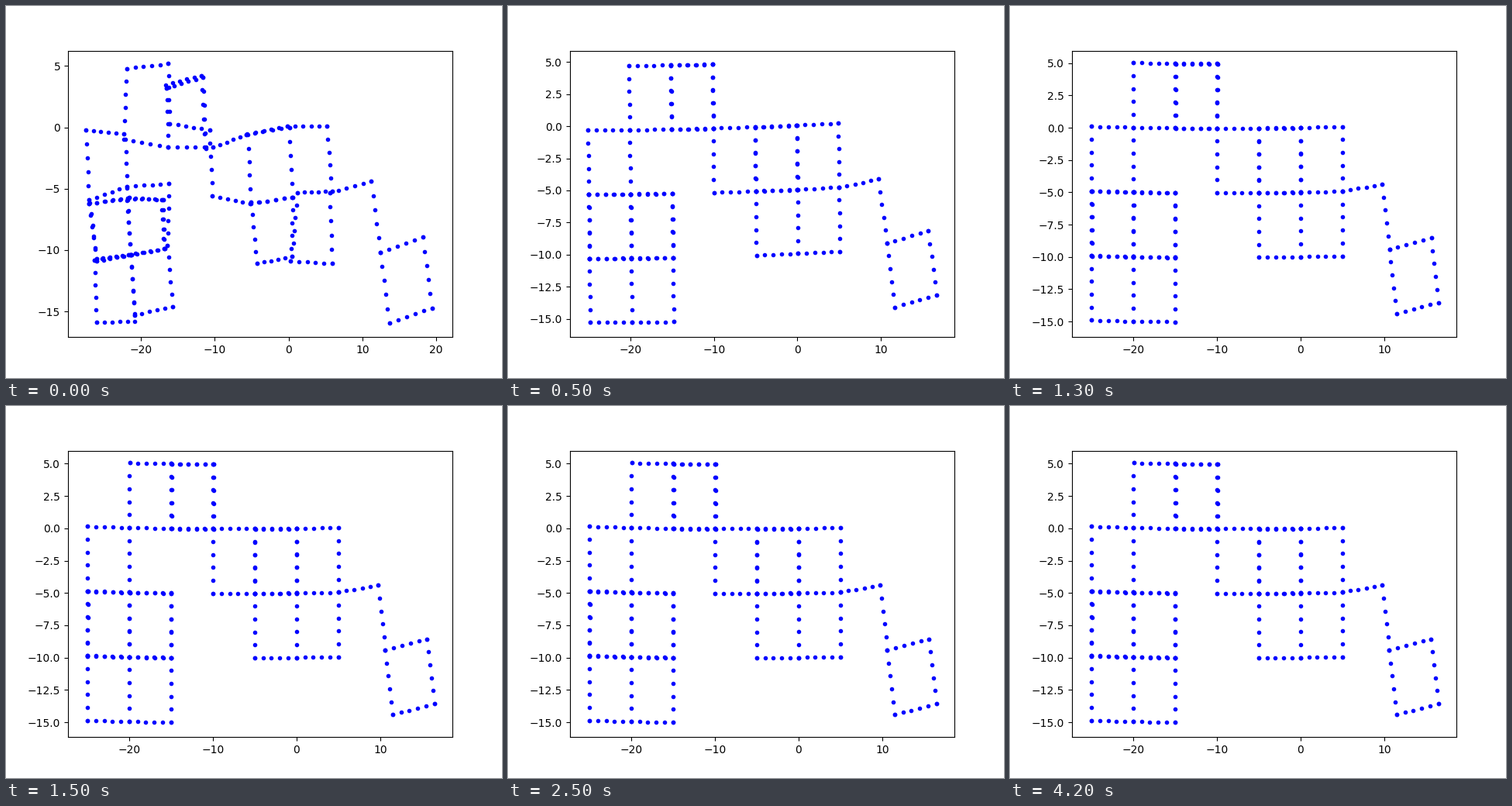
These frames come from a looping animation (640 by 480 pixels, 5 s). A matplotlib script:

```python
import numpy as np
import matplotlib.pyplot as plt
from matplotlib.animation import FuncAnimation

COMPASS = {"E": (1, 0), "N": (0, 1), "W": (-1, 0), "S": (0, -1)}

# View per solver iteration: x0, x1, y0, y1
VIEWS = [
    (-29.88, 22.20, -17.09, 6.254),
    (-27.24, 18.81, -16.429, 5.891),
    (-27.34, 18.63, -16.20, 5.96),
    (-27.34, 18.63, -16.15, 6.01),
]
TILTS = [None, 0.018, -0.001, -0.003]  # remaining rotation of the solved map
PIVOT = (-4, -5)


def drive(start, moves, leg=5.0, tilt=0.0):
    """Corners met when driving whole legs along a tilted compass."""
    c, s = np.cos(np.radians(tilt)), np.sin(np.radians(tilt))
    corners = [start]
    for move in moves:
        dx, dy = COMPASS[move]
        x, y = corners[-1]
        corners.append((x + leg * (c * dx - s * dy), y + leg * (s * dx + c * dy)))
    return corners


def stops(path, steps=5):
    """Evenly spaced stops on every leg of a path."""
    path = np.array(path)
    t = np.arange(steps + 1)[:, None] / steps
    return np.vstack([a + t * (b - a) for a, b in zip(path, path[1:])])


def odometry():
    """Dead reckoning: the same streets, drifting further on each pass."""
    rng = np.random.default_rng(4)
    west = [(-27.5, -0.2), (-27, -5.9), (-21.9, -4.8), (-16.2, -4.6),
            (-16.4, -9.6), (-15.7, -14.6), (-20.9, -15.3), (-21.3, -10.4),
            (-26.3, -10.8), (-26, -15.9), (-20.8, -15.8)]
    north = [(-27.5, -0.2), (-22.3, -0.5), (-21.9, 4.8), (-16.3, 5.2),
             (-16.1, 0.3), (-10.7, -0.2), (-10.3, -5.6), (-5.2, -6.2),
             (0.6, -5.7), (0.3, -10.9), (5.9, -11.1), (5.6, -5.3)]
    tail = drive((11.2, -4.4), "SSENW", leg=5.9, tilt=12)
    middle = [(-22.3, -1), (-16.3, -1.6), (-10.2, -1.6), (-5.7, -0.6),
              (-0.2, 0.1), (5.2, 0.1), (5.9, -5.2), (1.2, -5.3),
              (0.5, -10.5), (-4.3, -11.1), (-5.1, -6.1), (-5.5, -0.6)]
    box = [(-16.3, -1.6), (-16.5, 3.2), (-11.6, 4.1), (-11.2, -1.6)]
    yard = [(-27, -6.2), (-21.8, -5.8), (-17, -5.9), (-16.8, -9.9),
            (-21.5, -10.4), (-26, -10.9), (-27, -6.2)]
    spine = [(-22.1, -1), (-21.8, -5.9), (-21.4, -10.4), (-20.9, -15.2)]
    east = [(-5.6, -0.5), (0.1, 0), (0.5, -5.7), (-5.1, -6.2)]

    paths = [west, north + tail, middle, box, yard, spine, east]
    for again in (yard, box[1:], spine[1:3]):
        paths.append(np.array(again) + rng.normal(0, 0.12, (len(again), 2)))
    return np.vstack([stops(p) for p in paths])


def street_map():
    """Ideal streets: 5 m blocks, plus a tilted block in the south-east."""
    tail = [(5, -5)] + drive((9.75, -4.45), "SSENW", leg=5.08, tilt=9.9)
    paths = [
        drive((-25, 0), "SSSEENNWW"),
        drive((-20, 5), "SSSS"),
        drive((-20, 5), "EESSEEE"),
        drive((-15, 5), "S"),
        drive((-25, 0), "EEEEEESSWWNN"),
        drive((-25, -10), "EE"),
        drive((0, 0), "SS"),
        tail,
    ]
    revisits = [
        drive((-15, 5), "ESWN"),
        drive((-5, 0), "ESWN"),
        drive((-25, -5), "EESWWN"),
        drive((-20, -5), "S"),
    ]
    return np.vstack([stops(p) for p in paths]
                     + [stops(p) + (0.03, -0.03) for p in revisits])


def solved(tilt):
    """The street map with a slight sag and the rotation still left."""
    x, y = street_map().T
    sag = 0.0006 * (np.minimum(x, 5) + 10) ** 2 - 0.05
    return np.column_stack([x - tilt * (y - PIVOT[1]),
                            y + tilt * (x - PIVOT[0]) + sag])


fig, ax = plt.subplots(figsize=(6.4, 4.8), dpi=100)
dots, = ax.plot([], [], "b.")


def update(frame):
    step = min(frame, len(VIEWS) - 1)  # converged after the last view
    points = solved(TILTS[step]) if step else odometry()
    ax.axis(VIEWS[step])
    dots.set_data(*points.T)
    return dots,


anim = FuncAnimation(fig, update, frames=10, interval=500, repeat=True)
plt.show()
```
